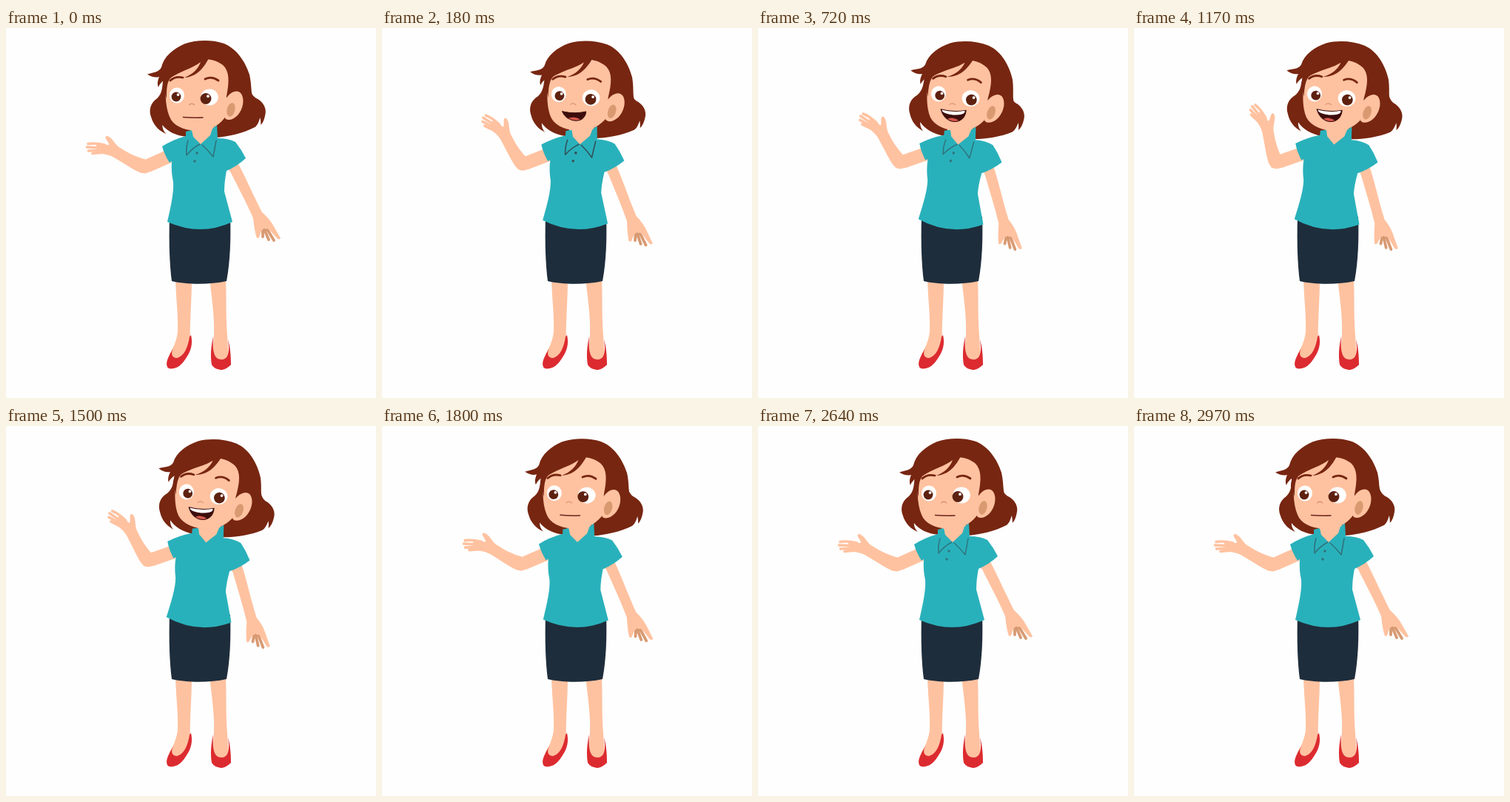
An HTML page with a canvas that plays this animation: 500 by 500 pixels, repeating every 3030 ms.

```html
<!DOCTYPE html>
<html lang="en">
<head>
<meta charset="utf-8">
<title>Waving woman</title>
<style>
html, body { margin: 0; width: 100%; height: 100%; overflow: hidden; background: #fefefe; }
canvas { display: block; width: 100%; height: 100%; }
</style>
</head>
<body>
<canvas id="stage" width="500" height="500"></canvas>
<script>
const ctx = document.getElementById('stage').getContext('2d');
const LOOP = 3030;
const SKIN = '#ffc2a0', SHADE = '#d99a72', HAIR = '#772611', TEAL = '#29b1bb',
      NAVY = '#1e2d3b', RED = '#dc2b30', IRIS = '#5e2110', DARK = '#3d0d0c';

// Motion tracks: [time, value] pairs
const tracks = {
  lean: [[0, 0], [320, 0.083], [1620, 0.083], [1860, 0]],
  wave: [[0, 0], [305, 43.5], [790, 25], [1190, 43.5], [1590, 25], [1810, 0]],
  arm: [[0, 0], [485, 0.1], [1620, 0.1], [1945, 0]],
  smile: [[0, 0], [270, 1], [1600, 1], [1780, 0]],
  trim: [[0, 0.58], [180, 0.9], [330, 0.58], [720, 0.55], [1110, 0], [2190, 0], [2310, 0.06], [2730, 0.58]]
};

const ease = x => (1 - Math.cos(Math.PI * x)) / 2;

function at(track, t) {
  let i = track.length - 1;
  while (track[i][0] > t) i--;
  const [t0, a] = track[i];
  if (i === track.length - 1) return a;
  const [t1, b] = track[i + 1];
  return a + (b - a) * ease((t - t0) / (t1 - t0));
}

const shapes = {};
const shape = d => shapes[d] || (shapes[d] = new Path2D(d));

function fill(d, color) {
  ctx.fillStyle = color;
  ctx.fill(shape(d));
}

function line(d, color, width) {
  ctx.strokeStyle = color;
  ctx.lineWidth = width;
  ctx.stroke(shape(d));
}

function oval(x, y, rx, ry, color, tilt = 0) {
  ctx.fillStyle = color;
  ctx.beginPath();
  ctx.ellipse(x, y, rx, ry, tilt, 0, Math.PI * 2);
  ctx.fill();
}

function turned(x, y, angle, draw) {
  ctx.save();
  ctx.translate(x, y);
  ctx.rotate(angle);
  ctx.translate(-x, -y);
  draw();
  ctx.restore();
}

function legs() {
  fill('M229 338 C230 370 233 390 232 410 C231 422 226 432 221 441 L226 449 L240 445 L249 420 C248 400 251 370 251 338Z', SKIN);
  fill('M275 338 C278 365 282 390 281 414 L279 440 L290 450 L301 444 L299 416 C297 390 298 365 297 338Z', SKIN);
  fill('M250 415 C252 424 251 432 247 440 C242 449 236 457 230 459 C225 461 219 461 218 458 C215 452 220 443 226 433 C222 441 225 446 231 446 C240 444 246 432 248 417Z', RED);
  fill('M280 417 C277 430 276 443 278 455 C281 460 287 462 292 462 C297 461 301 458 304 455 C304 442 303 431 300 421 C302 434 302 447 292 448 C280 448 279 435 280 417Z', RED);
}

function skirt() {
  fill('M221 255 C220 290 221 320 224 342 C245 347 276 347 298 342 C303 315 304 285 303 255Z', NAVY);
}

function wavingArm(angle) {
  fill('M230 158 L221 163 L190 177 Q178 184 181 195 Q188 197 196 194 L230 179Z', SKIN);
  turned(187, 187, angle * Math.PI / 180, () => {
    oval(187, 187, 9.3, 9.3, SKIN);
    fill('M190 178 C175 174 165 169 156 163 C150 160 147 155 143 150 C140 147 137 145 135 146.5 C133 149 138 153 139 157 C139 159 136 158 132 156 L122 157 L123 168 C130 171 138 170 146 175 C158 182 168 189 178 194 Q184 197 190 196Z', SKIN);
    line('M133 158 Q121 155 111 156.5 M131 162 L109.5 161 M131 165 L111.5 166 M133 168 L117 169.5', SKIN, 3.6);
  });
}

function restingArm(angle) {
  turned(308, 185, angle, () => {
    line('M347 274 L347 282 M349 272 L355 286 M353 272 L362 287', SHADE, 3.8);
    fill('M296 186 L313 182 C323 200 334 226 346 249 C353 255 359 262 363 270 L371 284 Q369 287 366 284 L357 274 Q350 267 345 274 L342 283 Q339 286 338 281 C336 273 335 266 334 257 C325 236 312 212 303 194Z', SKIN);
  });
}

function shirt(trim) {
  fill('M243 140 L251 138 L253 147 L263 157 L276 145 L279 136 L285 131 L286 149 Q300 149 310 154 Q318 164 324 176 Q312 187 298 193 Q295 208 295 221 L306 262 Q263 282 218 262 C223 240 227 222 226 208 Q223 195 224 180 L221 182 Q214 171 211 160 Q225 151 243 146Z', TEAL);
  if (!trim) return;
  ctx.globalAlpha = trim;
  line('M246 152 Q243 162 244 172 Q252 162 262 157 M265 158 Q273 165 280 174 L284 152', '#33474f', 1.6);
  oval(258, 169, 1.8, 1.8, '#33474f');
  oval(255, 180, 1.8, 1.8, '#33474f');
  ctx.globalAlpha = 1;
}

function backHair(sway) {
  ctx.save();
  ctx.translate(sway, 0);
  fill('M213 66 C212 80 212 88 205 95 C196 101 193 111 197 121 C200 131 207 139 217 143 C213 139 212 135 212 131 C218 139 230 146 246 147 L262 110 L230 70Z', HAIR);
  fill('M328 66 C330 87 333 92 341 96 C349 101 353 109 351 117 C350 123 348 128 345 131 C345 128 345 125 344 121 C342 128 340 132 337 134 C322 142 300 147 284 148 L275 120 L300 60Z', HAIR);
  ctx.restore();
  fill('M191 62.5 C198 60 207 60 210 53 C213 39 226 28 241 21.5 C257 16 277 15.5 293 20.5 C312 27 324 47 329 63 C332 76 331 86 333 92 L300 120 L225 120 L216 92 C211 88 211 78 214 70 C209 74 207 77 206 80 C204 76 205 71 207 66 C202 67.5 196 66 191 62.5Z', HAIR);
}

function eye(x, y, rx, ry, r, dx) {
  oval(x, y, rx, ry, '#ffffff');
  oval(x + dx, y + 2, r, r, IRIS);
  oval(x + dx + r * 0.4, y + 2 - r * 0.45, 1.9, 1.9, '#ffffff');
}

function mouth(open) {
  if (open < 0.04) {
    line('M239.5 120.5 Q252 121.5 266 121', '#6b241c', 1.5);
    return;
  }
  const half = 13 + 4 * open, cx = 253;
  const top = 120.5 - 9 * open, low = top + 1 + 18 * open;
  const trace = () => {
    ctx.beginPath();
    ctx.moveTo(cx - half, top);
    ctx.quadraticCurveTo(cx, top + 3, cx + half, top - 1.5 * open);
    ctx.bezierCurveTo(cx + half, low, cx - half + 8, low + 3 * open, cx - half, top);
  };
  ctx.save();
  trace();
  ctx.fillStyle = DARK;
  ctx.fill();
  ctx.clip();
  oval(cx, low - 3.5, 9, 5 * open, '#d6584c');
  const teeth = Math.max(0, open - 0.75) / 0.25;
  if (teeth) oval(cx, top + 0.8, half - 1.5, 5.4 * teeth, '#ffffff');
  ctx.restore();
  trace();
  ctx.strokeStyle = DARK;
  ctx.lineWidth = 1;
  ctx.stroke();
}

function head(smile) {
  fill('M217 70 C214 90 216 112 223 124 C230 135 246 139 262 139 C278 138 290 130 298 118 L298 92 C302 72 302 58 293 50 C285 44 276 42 268 42 C255 50 235 60 217 70Z', SKIN);
  fill('M297 96 C303 86 313 82 318 89 C323 97 320 110 313 118 C307 124 300 126 296 122Z', SKIN);
  oval(304, 110.5, 5.4, 9.5, SHADE, 0.25);
  eye(231, 91, 10, 10.5, 6.4, -1 + 3 * smile);
  eye(275, 93.5, 11.8, 11, 7.4, -5 + 6 * smile);
  line('M222 71 Q229 64.5 239 67', HAIR, 2.8);
  line('M269 69 Q278 64.5 287 71', HAIR, 2.8);
  line('M247.5 104 Q250.5 100.5 255 104', '#dc9470', 1.2);
  mouth(smile);
  fill('M274 41 C267 54 258 66 241 67 C252 63 260 55 263 46 C250 56 230 60 222 68 C217 74 217 84 217 96 L213 80 L213 64 L240 40Z', HAIR);
}

function render(t) {
  const pose = {};
  for (const key in tracks) pose[key] = at(tracks[key], t);
  const sway = 0.1 + 2.4 * Math.cos(2 * Math.PI * (t - 1030) / (LOOP / 5));

  ctx.fillStyle = '#fefefe';
  ctx.fillRect(0, 0, 500, 500);
  ctx.lineCap = ctx.lineJoin = 'round';

  legs();
  skirt();
  turned(262, 245, pose.lean, () => {
    backHair(sway);
    wavingArm(pose.wave);
    restingArm(pose.arm);
    fill('M251 128 L249 146 L263 159 L281 146 L281 126Z', SKIN);
    shirt(pose.trim);
    head(pose.smile);
  });
}

function tick() {
  render(Math.min(performance.now() % LOOP, 2970));
  requestAnimationFrame(tick);
}
render(0);
tick();
</script>
</body>
</html>
```
